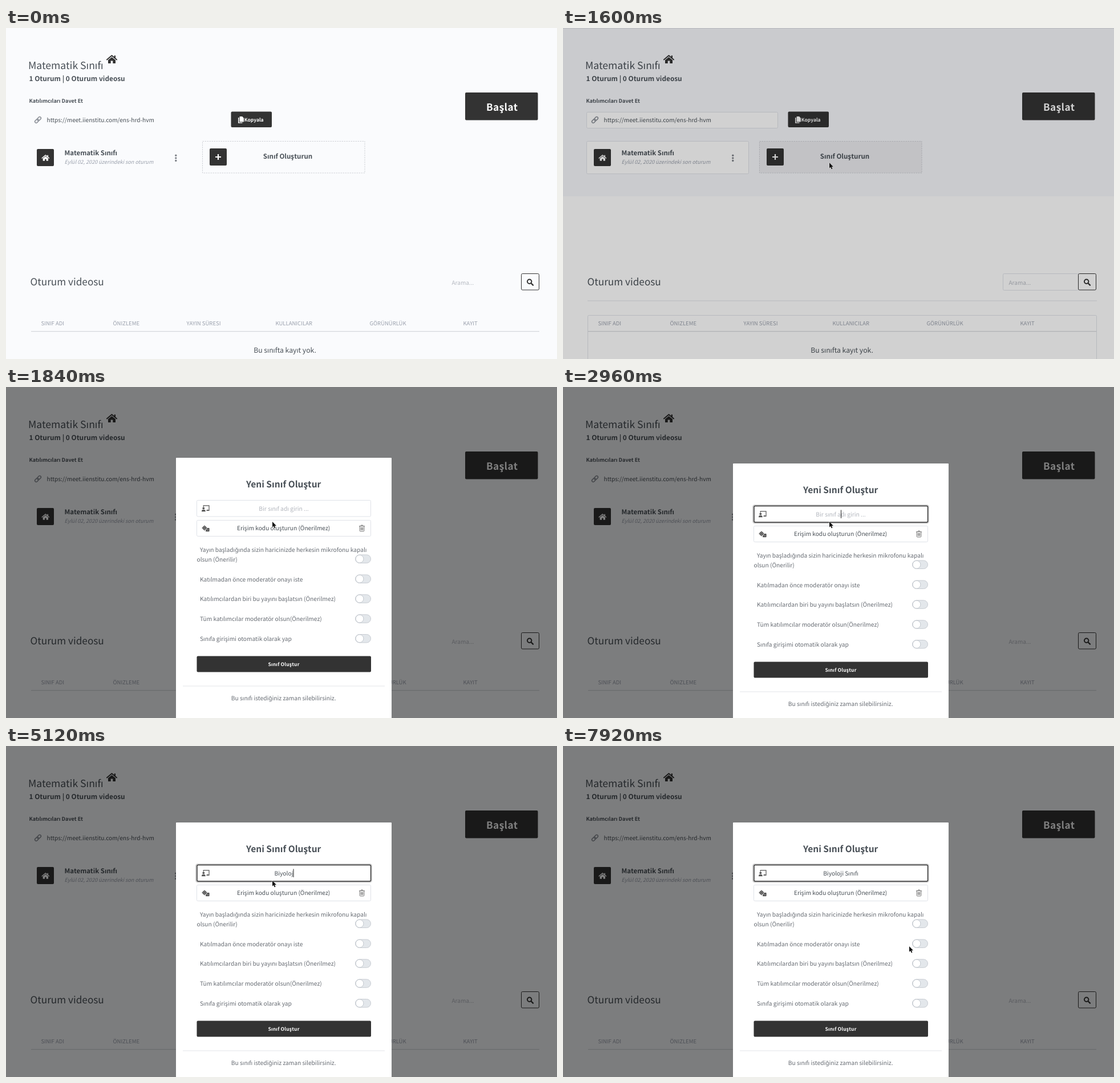
Animation, 966 px wide and 580 px high, one loop 8000 ms. Source, as an HTML page:

```html
<!DOCTYPE html>
<html lang="tr">
<head>
<meta charset="utf-8">
<title>Yeni Sınıf Oluştur</title>
<style>
html, body { margin: 0; width: 100%; height: 100%; overflow: hidden; background: #fafbfd; }
svg { display: block; width: 100%; height: 100%; }
text {
  font-family: "Noto Sans CJK JP", "Noto Sans CJK SC", "Noto Sans", sans-serif;
  text-rendering: geometricPrecision;
  white-space: pre;
}
</style>
</head>
<body>
<svg id="stage" viewBox="0 0 966 580" xmlns="http://www.w3.org/2000/svg"></svg>
<script>
const LOOP = 8000, STEP = 80;
const INK = '#333', TEXT = '#495057', MUTED = '#9aa0ac', LINE = '#dfe2e8';

const text = (x, y, size, str, { fill = TEXT, bold, anchor = 'start', extra = '' } = {}) =>
  `<text x="${x}" y="${y}" font-size="${size}" fill="${fill}" text-anchor="${anchor}"
    font-weight="${bold ? 600 : 400}" ${extra}>${str}</text>`;
const rect = (x, y, w, h, fill, r = 0, extra = '') =>
  `<rect x="${x}" y="${y}" width="${w}" height="${h}" rx="${r}" fill="${fill}" ${extra}/>`;
const box = (x, y, w, h, fill = '#fff', stroke = LINE) =>
  rect(x, y, w, h, fill, 2, `stroke="${stroke}"`);
const hline = (x1, x2, y, color) => `<path d="M${x1} ${y}H${x2}" stroke="${color}"/>`;
const group = (id, body) => `<g id="${id}">${body}</g>`;
const at = (x, y, body, k = 1) => `<g transform="translate(${x} ${y}) scale(${k})">${body}</g>`;

const house = (x, y, k, color) => at(x, y, `<g fill="${color}">
  <path d="M.9 8.4 9.5 1.2 18.1 8.4" fill="none" stroke="${color}" stroke-width="1.9" stroke-linecap="round" stroke-linejoin="round"/>
  <path d="M13.7 1.2H16V6.4L13.7 4.4ZM3 9.2 9.5 3.9 16 9.2V14.4Q16 15 15.4 15H11.3V10.6H7.7V15H3.6Q3 15 3 14.4Z"/></g>`, k);

const linkIcon = at(56, 161, `<g transform="rotate(-45)" fill="none" stroke="#8f939b" stroke-width="1.6">
  <rect x="-6.6" y="-2.3" width="7.6" height="4.6" rx="2.3"/>
  <rect x="-1" y="-2.3" width="7.6" height="4.6" rx="2.3"/></g>`);

const copyIcon = `<path d="M409.6 155h4.6l2.7 2.9v6.6h-7.3z" fill="#fff"/>
  <path d="M408.5 157h-1.5v9.8h7.4v-1.4h-5.9z" fill="#fff"/>`;

const teacherIcon = at(343, 217, `<path d="M3.2 3V.8H13V9.3H8.5" fill="none" stroke="#555" stroke-width="1.2"/>
  <path d="M9 8.2h3v1.6H9z" fill="#555"/>
  <circle cx="3.3" cy="5.4" r="1.9" fill="#555"/>
  <path d="M0 11.3Q0 8 2.3 8H4.3Q6.7 8 6.7 11.3Z" fill="#555"/>`);

const diceIcon = at(343, 252, `<rect x="1.6" y="1.6" width="6.8" height="6.8" rx="1" transform="rotate(45 5 5)" fill="#555"/>
  <path d="M10.2 5H12.8Q13.6 5 13.6 5.8V10.4Q13.6 11.2 12.8 11.2H7.8Q7 11.2 7 10.4V9.6Z" fill="#555"/>
  <g fill="#fff"><circle cx="5" cy="2.5" r=".6"/><circle cx="5" cy="5" r=".6"/><circle cx="5" cy="7.5" r=".6"/>
  <circle cx="2.5" cy="5" r=".6"/><circle cx="7.5" cy="5" r=".6"/><circle cx="10.8" cy="8.3" r=".6"/></g>`);

const trashIcon = at(619, 251.5, `<path d="M0 2.3H10M3 2.3 3.7.6H6.3L7 2.3M1.2 2.3V10.3Q1.2 11.4 2.3 11.4H7.7Q8.8 11.4 8.8 10.3V2.3M3.4 4.3V9.5M5 4.3V9.5M6.6 4.3V9.5"
  fill="none" stroke="#666" stroke-width=".9"/>`);

const toggle = y => rect(612.5, y - 7.5, 27, 14.5, '#e3e7eb', 7.25, 'stroke="#c9cdd3"') +
  `<circle cx="620" cy="${y - .25}" r="6.9" fill="#fff" stroke="#bfc4cb" stroke-width=".9"/>`;

const headers = [[62, 'SINIF ADI'], [188, 'ÖNIZLEME'], [317, 'YAYIN SÜRESI'],
  [473, 'KULLANICILAR'], [638, 'GÖRÜNÜRLÜK'], [802, 'KAYIT']];

const page =
  group('bands', rect(0, 0, 966, 295, '#f6f7fb') + rect(0, 295, 966, 285, '#fff') + hline(0, 966, .5, '#e2e4e9')) +
  group('frames', box(41.5, 147.5, 335, 28) + box(41.5, 198.5, 284, 57) + box(771.5, 430.5, 132, 29) +
    box(43.5, 503.5, 892, 90) + hline(43, 936, 478, LINE)) +
  text(39, 72, 17.6, 'Matematik Sınıfı') + house(176, 47, 1, INK) +
  text(40.5, 93.3, 11.85, '1 Oturum | 0 Oturum videosu', { bold: 1 }) +
  text(40.5, 131.3, 9.1, 'Katılımcıları Davet Et', { bold: 1 }) +
  linkIcon + text(71.5, 165, 10.15, 'https://meet.iienstitu.com/ens-hrd-hvm') +
  rect(394.5, 146.5, 71.5, 27.5, INK, 2) + copyIcon +
  text(417.8, 164, 8.5, 'Kopyala', { fill: '#fff', bold: 1 }) +
  rect(805, 113, 127.5, 48.5, INK, 2) +
  text(842, 145, 17.2, 'Başlat', { fill: '#fff', bold: 1, extra: 'letter-spacing=".4"' }) +
  rect(54, 212, 30, 30, INK, 2) + house(62.5, 222, .72, '#fff') +
  text(102.5, 223, 11.5, 'Matematik Sınıfı', { bold: 1 }) +
  text(102.5, 237.7, 9.15, 'Eylül 02, 2020 üzerindeki son oturum', { fill: MUTED, extra: 'font-style="italic"' }) +
  [223.3, 227.9, 232.5].map(y => `<circle cx="297.8" cy="${y}" r="1.7" fill="#7d8188"/>`).join('') +
  rect(344.5, 198.5, 284.5, 55.5, 'none', 0, 'id="create" stroke="#cfd1d6" stroke-dasharray="2.5 1.5"') +
  rect(357, 211, 30, 30, INK, 2) + '<path d="M367 226h10M372 221v10" stroke="#fff" stroke-width="2.2"/>' +
  text(494, 229, 11.6, 'Sınıf Oluşturun', { bold: 1, anchor: 'middle' }) +
  text(42.5, 451, 17.2, 'Oturum videosu') +
  text(781.5, 449.7, 10.05, 'Arama...', { fill: '#b4b8c0' }) +
  box(903.5, 430.5, 31, 28.5, 'none', INK) +
  `<circle cx="917.7" cy="444.3" r="3.7" fill="none" stroke="${INK}" stroke-width="2"/>
   <path d="M920.6 447.2 924 450.6" stroke="${INK}" stroke-width="2.3" stroke-linecap="round"/>` +
  headers.map(([x, s]) => text(x - .5, 521, 9.5, s, { fill: MUTED })).join('') +
  hline(44, 935, 531.7, '#cccfd4') +
  text(489, 568.5, 12.2, 'Bu sınıfta kayıt yok.', { anchor: 'middle' });

const options = [[350.5, 'Katılmadan önce moderatör onayı iste'],
  [385.3, 'Katılımcılardan biri bu yayını başlatsın (Önerilmez)'],
  [420.3, 'Tüm katılımcılar moderatör olsun(Önerilmez)'],
  [455, 'Sınıfa girişimi otomatik olarak yap']];
const label = (x, y, str) => text(x, y, 10.2, str, { fill: '#666b72' });

const dialog = rect(298, 134, 378, 500, '#fff', 1) +
  text(486.7, 186, 15.5, 'Yeni Sınıf Oluştur', { bold: 1, anchor: 'middle' }) +
  box(334.5, 208.5, 305, 28.5) +
  group('ring', rect(333.5, 207.5, 307, 30.5, 'none', 3, 'stroke="#000" stroke-opacity=".2" stroke-width="3"') +
    rect(335, 208.5, 304.5, 28.5, '#fff', 2, `stroke="${INK}" stroke-width="1.4"`)) +
  teacherIcon +
  text(487, 227, 10.25, 'Bir sınıf adı girin ...', { fill: '#b2b6bd', anchor: 'middle', extra: 'id="hint"' }) +
  text(487, 227, 10.25, '', { extra: 'id="typed"' }) +
  rect(0, 215.5, 1, 14.5, '#222', 0, 'id="caret"') +
  box(334.5, 243.5, 305, 28) + diceIcon + trashIcon +
  text(486.7, 261.2, 10.2, 'Erişim kodu oluşturun (Önerilmez)', { anchor: 'middle' }) +
  label(340, 299.2, 'Yayın başladığında sizin haricinizde herkesin mikrofonu kapalı') +
  label(334.5, 316, 'olsun (Önerilir)') + toggle(311.5) +
  options.map(([y, s]) => label(340, y, s) + toggle(y - 4)).join('') +
  rect(334.5, 481.5, 305.5, 28, INK, 2) +
  text(487, 498.7, 8.5, 'Sınıf Oluştur', { fill: '#fff', bold: 1, anchor: 'middle', extra: 'letter-spacing=".2"' }) +
  hline(310, 664, 534, '#e3e5e9') +
  text(486.7, 559, 10.2, 'Bu sınıfı istediğiniz zaman silebilirsiniz.', { fill: '#666b72', anchor: 'middle' });

const pointer = `<path id="pointer" d="M0 0V9.8L2.2 7.8 3.8 11.4 5.5 10.6 3.9 7.2H7Z"
  fill="#111" stroke="#fff" stroke-width=".8" paint-order="stroke"/>`;

document.getElementById('stage').innerHTML = rect(0, 0, 966, 580, '#fafbfd') + page +
  rect(0, 0, 966, 580, '#000', 0, 'id="shade"') + group('dialog', dialog) + pointer;

const el = {};
document.querySelectorAll('[id]').forEach(node => el[node.id] = node);

const NAME = 'Biyoloji Sınıfı';
const KEYS = [4160, 4320, 4480, 4560, 4720, 4880, 5120, 5280, 5440, 5600, 5840, 5920, 6000, 6080, 6240];
const OPEN = 1690, FOCUS = 2000;
const PATH = [[400, 640, 590], [1200, 468, 238], [1280, 467, 236], [7280, 467, 236], [7760, 607, 361], [7920, 607, 351]];

const ramp = (t, start, length) => Math.min(1, Math.max(0, (t - start) / length));
const smooth = p => p * p * (3 - 2 * p);
const easeOut = p => 1 - (1 - p) ** 2;
const show = (node, on) => node.setAttribute('display', on ? 'inline' : 'none');

function pointerAt(t) {
  let [, x, y] = PATH[0];
  for (let i = 1; i < PATH.length; i++) {
    const [t0, x0, y0] = PATH[i - 1], [t1, x1, y1] = PATH[i];
    if (t < t0) break;
    const p = smooth(ramp(t, t0, t1 - t0));
    x = x0 + (x1 - x0) * p;
    y = y0 + (y1 - y0) * p;
  }
  return [x, y];
}

function drawField(t) {
  const count = KEYS.filter(k => k <= t).length;
  const since = t - (count ? KEYS[count - 1] : FOCUS);
  el.typed.textContent = NAME.slice(0, count);
  const width = count ? el.typed.getComputedTextLength() : 0;
  el.typed.setAttribute('x', 487 - width / 2);
  el.caret.setAttribute('x', 487 + width / 2);
  show(el.hint, !count);
  show(el.caret, since >= 0 && since % 960 < 480);
  el.ring.setAttribute('opacity', ramp(t, FOCUS - 80, 150));
}

function draw(t) {
  show(el.bands, t >= 1440 && t < 1680);
  show(el.frames, t >= 1440 && t < 1760);
  el.create.setAttribute('fill', t >= 1120 && t < 1680 ? '#ececf0' : 'none');
  el.shade.setAttribute('opacity', .5 * ramp(t, 1546, 150));

  show(el.dialog, t > OPEN);
  el.dialog.setAttribute('opacity', ramp(t, OPEN, 150));
  el.dialog.setAttribute('transform', `translate(0 ${-40 * (1 - easeOut(ramp(t, OPEN, 300)))})`);
  if (t > OPEN) drawField(t);

  show(el.pointer, t >= 400 && !(t >= KEYS[0] && t < 5120));
  el.pointer.setAttribute('transform', `translate(${pointerAt(t)})`);
}

const began = performance.now();
function tick() {
  const t = (performance.now() - began) % LOOP;
  draw(Math.floor(t / STEP) * STEP);
  requestAnimationFrame(tick);
}
tick();
</script>
</body>
</html>
```
